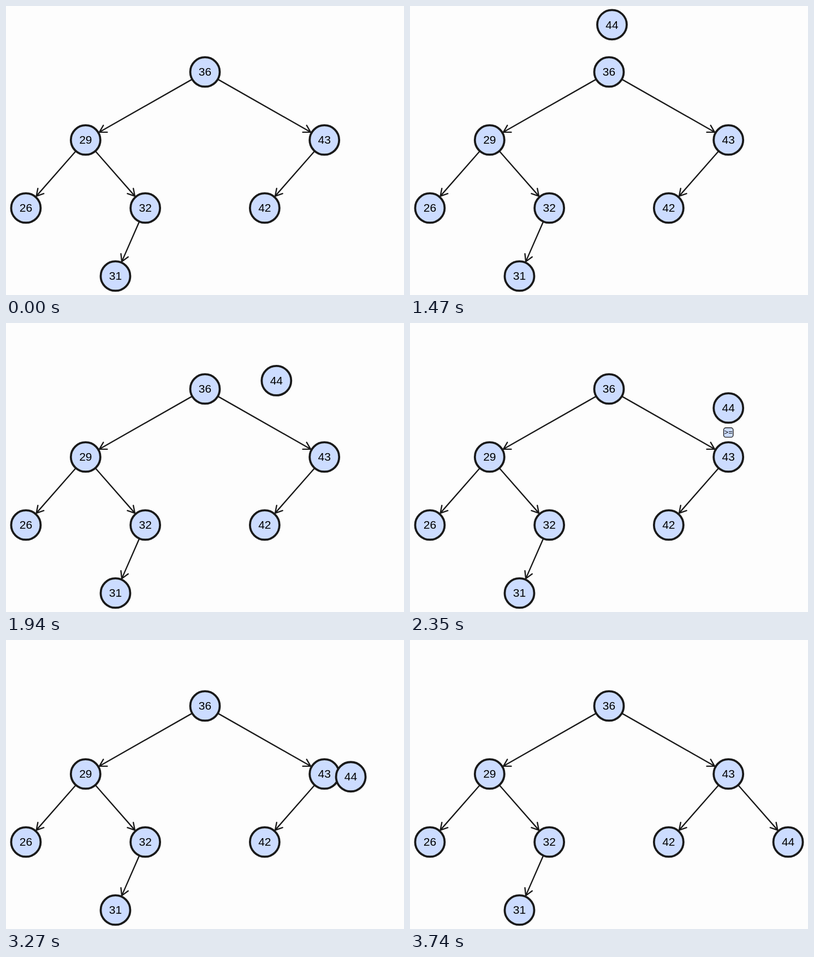
An HTML page that plays this animation: 729x531 px, repeating every 4.49 s.

```html
<!DOCTYPE html>
<html lang="en">
<head>
<meta charset="utf-8">
<title>Tree insertion</title>
<style>
  html, body { margin: 0; width: 100%; height: 100%; overflow: hidden; background: #fdfdfd; }
  svg { display: block; width: 729px; height: 531px; }
  circle { fill: #ccdcff; stroke: #1a1a1a; stroke-width: 3.8; }
  path { fill: none; stroke: #1a1a1a; stroke-width: 2.4; stroke-linecap: round; }
  rect { fill: #ccdcff; stroke: #1a1a1a; stroke-width: 1.4; }
  text { font: 21px Arial, "Liberation Sans", sans-serif; text-anchor: middle; fill: #000; }
  .badge text { font-size: 13px; }
</style>
</head>
<body>
<svg viewBox="0 0 729 531"><g id="edges"></g><g id="nodes"></g></svg>
<script>
const LOOP = 4490;
const TRAVEL = 820;
const GAP = 29;
const edges = document.getElementById('edges');
const nodes = document.getElementById('nodes');

function add(parent, tag, attrs = {}, text = '') {
  const el = document.createElementNS('http://www.w3.org/2000/svg', tag);
  for (const key in attrs) el.setAttribute(key, attrs[key]);
  el.textContent = text;
  return parent.appendChild(el);
}

// Column 0 is the centre; one column is 15% of the stage width.
const place = (col, row) => ({ x: 364.5 + col * 109.35, y: 121.2 + row * 125 });

const spots = {
  36: place(0, 0),
  29: place(-2, 1), 43: place(2, 1),
  26: place(-3, 2), 32: place(-1, 2), 42: place(1, 2), 44: place(3, 2),
  31: place(-1.5, 3)
};

function moveTo(el, p) {
  el.setAttribute('transform', `translate(${p.x.toFixed(2)} ${p.y.toFixed(2)})`);
}

function addNode(value, p) {
  const g = add(nodes, 'g');
  add(g, 'circle', { r: 27 });
  add(g, 'text', { y: 7.2 }, value);
  moveTo(g, p);
  return g;
}

function addEdge(from, to) {
  const a = spots[from], b = spots[to];
  const angle = Math.atan2(b.y - a.y, b.x - a.x);
  const step = (p, dir, len) => ({ x: p.x + Math.cos(dir) * len, y: p.y + Math.sin(dir) * len });
  const fmt = p => `${p.x.toFixed(2)} ${p.y.toFixed(2)}`;
  const tip = step(b, angle, -GAP);
  const wing = turn => fmt(step(tip, angle + Math.PI + turn, 14.5));
  const d = `M${fmt(step(a, angle, GAP - 1))}L${fmt(tip)}` +
            `M${wing(Math.PI / 6)}L${fmt(tip)}L${wing(-Math.PI / 6)}`;
  return add(edges, 'path', { d });
}

[[36, 29], [36, 43], [29, 26], [29, 32], [43, 42], [32, 31]].forEach(e => addEdge(...e));
const newEdge = addEdge(43, 44);

for (const value of [36, 29, 43, 26, 32, 42, 31]) addNode(value, spots[value]);

const above = p => ({ x: p.x, y: p.y - 90 });
const stops = [above(spots[36]), above(spots[43]), spots[44]];
const mover = addNode(44, stops[0]);

const badge = add(nodes, 'g', { class: 'badge' });
add(badge, 'rect', { x: -8.7, y: -8.7, width: 17.4, height: 17.4, rx: 4 });
add(badge, 'text', { y: 4.2 }, '>=');

// Each leg advances at constant speed, redrawn at these moments.
const legs = [
  { ticks: [1470, 1580, 1650, 1730, 1800, 1870, 1940, 2030, 2110, 2190, 2270], start: 1449.5 },
  { ticks: [2960, 3050, 3120, 3200, 3270, 3350, 3420, 3510, 3590, 3670, 3740], start: 2907.5 }
];

function position(t) {
  let p = stops[0];
  legs.forEach(({ ticks, start }, i) => {
    const now = ticks.filter(k => k <= t).pop();
    if (now === undefined) return;
    const last = now === ticks[ticks.length - 1];
    const f = last ? 1 : Math.min(1, (now - start) / TRAVEL);
    const a = stops[i], b = stops[i + 1];
    p = { x: a.x + (b.x - a.x) * f, y: a.y + (b.y - a.y) * f };
  });
  return p;
}

const show = (el, on) => el.setAttribute('visibility', on ? 'visible' : 'hidden');

function draw(t) {
  const p = position(t);
  moveTo(mover, p);
  moveTo(badge, { x: p.x, y: p.y + 45 });
  show(mover, t >= 150);
  show(badge, (t >= 860 && t < 1470) || (t >= 2350 && t < 2960));
  show(newEdge, t >= 3740);
}

function tick() {
  draw(performance.now() % LOOP);
  requestAnimationFrame(tick);
}
tick();
</script>
</body>
</html>
```
